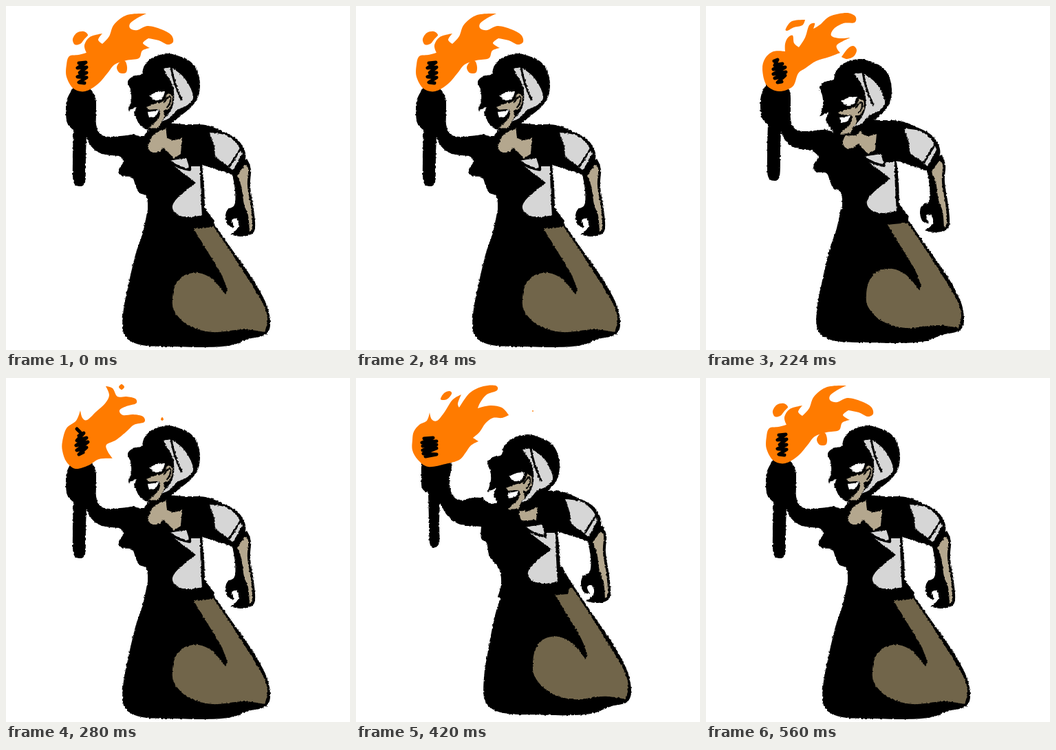
Write an HTML page that moves like this. It is 500 px wide and 500 px high and loops after 0.63 s.

```html
<!DOCTYPE html>
<html lang="en">
<head>
<meta charset="utf-8">
<title>Torch bearer</title>
<style>
  html, body { margin: 0; width: 100%; height: 100%; overflow: hidden; background: #fff; }
  svg { display: block; width: 100vw; height: 100vh; }
</style>
</head>
<body>
<svg id="stage" viewBox="0 0 500 500">
  <filter id="rough" filterUnits="userSpaceOnUse" x="0" y="0" width="500" height="500" color-interpolation-filters="sRGB">
    <feTurbulence type="fractalNoise" baseFrequency=".35" numOctaves="1" seed="4"/>
    <feDisplacementMap in="SourceGraphic" scale="3.5" xChannelSelector="R" yChannelSelector="G"/>
  </filter>
</svg>
<script>
const INK = '#000', CLOTH = '#d6d6d6', SKIN = '#b4a78e', BROWN = '#71654a', FIRE = '#ff7b00', WHITE = '#fff';
const stage = document.getElementById('stage');

function add(parent, tag, attrs) {
  const el = document.createElementNS('http://www.w3.org/2000/svg', tag);
  for (const key in attrs) el.setAttribute(key, attrs[key]);
  return parent.appendChild(el);
}

// Closed smooth outline through the points; "!" marks a sharp corner.
function outline(text) {
  const pts = text.split(',').map(s => {
    const [x, y] = s.replace('!', '').trim().split(' ').map(Number);
    return { x, y, sharp: s.includes('!') };
  });
  const n = pts.length;
  const handle = (i, sign) => {
    const p = pts[i], a = pts[(i + n - 1) % n], b = pts[(i + 1) % n];
    const k = p.sharp ? 0 : sign / 6;
    return `${(p.x + (b.x - a.x) * k).toFixed(1)} ${(p.y + (b.y - a.y) * k).toFixed(1)}`;
  };
  let d = `M${pts[0].x} ${pts[0].y}`;
  for (let i = 0; i < n; i++) {
    const j = (i + 1) % n;
    d += `C${handle(i, 1)} ${handle(j, -1)} ${pts[j].x} ${pts[j].y}`;
  }
  return d + 'Z';
}

const fill = (g, color, pts) => add(g, 'path', { d: outline(pts), fill: color });
const line = (g, d, width) => add(g, 'path', {
  d, fill: 'none', stroke: INK, 'stroke-width': width, 'stroke-linecap': 'round', 'stroke-linejoin': 'round'
});
const group = (parent, transform) => add(parent, 'g', transform ? { transform } : {});

function drawSkirt(g) {
  fill(g, INK, '!205 300,!288 292,303 317,330 356,360 399,379 435,384 460,381 474,372 480,352 484,328 493,290 496,240 495,205 494,181 487,170 472,171 440,178 405,188 362,199 329');
  fill(g, BROWN, '!273 324,!302 321,325 355,354 400,374 434,380 455,!376 474,345 470,300 474,265 464,245 444,242 425,247 404,260 391,280 388,300 397,!319 419,!322 413,312 388,293 357');
}

function drawRightArm(g) {
  fill(g, INK, '!328 240,!350 222,356 237,355 262,360 295,362 322,356 332,340 335,!326 332,336 324,338 316,334 309,328 312,!332 322,323 319,319 307,322 296,332 289,333 268');
  fill(g, SKIN, '!336 247,!347 231,352 237,351 262,356 293,358 320,!354 328,352 305,346 288,342 262');
}

function drawTorso(g, front, neck) {
  fill(g, INK, '!205 182,232 171,262 172,290 173,312 181,335 193,346 208,348 222,340 238,!331 246,310 239,!285 231,288 262,!289 294,!303 312,!300 322,' + front);
  fill(g, SKIN, neck);
  fill(g, CLOTH, '!237 225,!262 221,!266 233,!282 233,283 270,!285 304,264 307,249 303,242 294,245 284,257 272,!276 257,!266 249,251 238');
  line(g, 'M238 226Q251 236 267 238L269 221', 4);
  fill(g, CLOTH, '!296 184,320 188,336 201,!343 215,!330 239,!318 229,305 219,303 204');
  line(g, 'M342 206Q334 218 325 233', 3);
}

function drawHead(g) {
  fill(g, INK, '!177 153,182 136,181 122,177 110,185 102,197 99,201 87,213 75,235 69,252 73,267 80,277 92,282 112,279 133,268 148,252 161,240 171,!230 180,208 180,196 174,!186 157,!190 146');
  fill(g, CLOTH, '!228 91,!240 89,256 101,267 117,272 134,262 145,249 151,239 162,!226 168,238 154,244 138,243 118,236 103');
  line(g, 'M240 89Q244 114 255 136', 3);
  fill(g, SKIN, '!204 147,217 142,229 138,!235 127,241 130,241 141,236 150,229 152,231 160,226 168,!222 177,!207 178,213 172,222 163,223 151,!209 151');
  line(g, 'M230 140Q236 129 239 133Q240 142 234 147', 2.5);
  fill(g, WHITE, '!208 130,220 125,!231 124,227 134,217 137');
  fill(g, WHITE, '!206 154,214 153,!222 151,218 159,!208 162');
}

const FRONT = '!203 316,206 295,204 277,193 271,188 260,183 249,168 247,164 238,171 225,!163 217,!166 190,185 187,198 190';
const FRONT_LEAN = '!211 330,!198 326,203 307,200 286,186 267,182 248,174 241,!174 224,!150 223,!152 184,172 182,190 191';
const NECK = '!206 205,213 189,223 182,!232 175,!234 191,243 195,!256 192,!254 215,!244 221,!229 206,222 212,211 212';
const NECK_LEAN = '!229 201,!237 194,!238 203,!256 196,!254 214,!241 215,232 214';

const ARM = '!98 118,!121 118,130 133,131 155,131 172,136 185,150 190,!185 187,!180 219,152 217,135 213,123 203,!117 190,116 220,115 255,107 262,98 255,97 222,!98 180,89 170,87 150,89 135';
const ARM_LEAN = '!95 118,!137 118,139 128,136 148,138 165,146 176,160 177,!185 173,!186 216,166 214,149 212,133 200,!122 182,121 210,121 239,113 247,107 239,106 205,!105 167,96 160,95 140';

// Offsets of each body part for the three poses.
const POSES = [
  { skirt: 'translate(0 0)', torso: 'translate(0 0)', arm: 'translate(0 0)', head: 'translate(0 0)' },
  { skirt: 'translate(-9 -6)', torso: 'translate(-8 -6)', arm: 'translate(-8 -8)', head: 'translate(-12 8)' },
  { skirt: 'matrix(1 0 .027 1.06 3.5 -35.4)', torso: 'translate(8 -8)', arm: 'translate(0 0)', head: 'translate(14 13)', lean: true }
];

const FLAMES = [
  {
    shapes: [
      '88 85,92 73,105 71,!117 68,114 57,122 45,!140 40,134 49,!140 55,150 44,157 27,176 13,!204 11,190 18,180 26,181 33,191 35,206 29,226 34,240 42,243 52,235 56,222 50,!207 47,199 54,!209 61,198 65,193 76,175 79,158 85,148 97,134 113,115 124,98 120,88 103',
      '97 48,103 39,113 37,119 42,114 48,108 55,100 56',
      '161 89,166 81,173 80,176 89,174 97,165 97'
    ],
    char: 'M106 83L116 82L104 90L117 89L107 97L117 97L104 103L117 104L106 111L114 112'
  },
  {
    shapes: [
      '82 92,86 76,98 66,!115 66,115 55,119 46,126 43,128 54,!135 60,144 46,150 28,158 25,!156 33,166 27,180 15,204 10,217 15,216 24,200 25,186 33,182 43,194 47,!210 46,190 57,!195 68,179 74,160 80,145 90,134 98,126 117,106 124,88 115',
      '116 33,125 22,!144 20,140 28,128 31,118 36',
      '!197 74,206 62,214 58,219 64,215 73,205 77'
    ],
    char: 'M99 80L104 78L100 86L111 84L98 92L115 89L98 99L116 96L100 105L115 101L104 111L110 110'
  },
  {
    shapes: [
      '82 92,88 73,102 62,!108 47,111 58,118 61,131 49,144 37,150 25,!145 12,155 15,162 27,175 27,188 30,189 37,175 41,165 47,170 54,185 53,199 56,201 64,186 68,176 77,160 90,146 97,148 107,!155 117,135 118,120 127,101 132,88 122,82 106',
      '164 13,168 9,172 13,168 17',
      '225 60,227 57,229 60,227 62'
    ],
    char: 'M103 74L108 79M106 84L113 80L103 91L117 87L102 98L119 93L103 105L117 101L106 111L112 108'
  },
  {
    shapes: [
      '82 90,84 78,92 68,103 62,!107 50,110 60,118 62,129 49,140 32,!153 24,148 37,!150 43,165 22,185 12,203 11,205 18,190 24,181 35,!177 44,195 40,212 43,!222 54,212 58,199 58,188 66,180 78,!170 87,!178 92,167 98,159 109,150 119,130 125,105 129,90 119,82 105',
      '123 31,128 22,136 19,139 23,132 31',
      '256 48,257 47,258 48,257 49'
    ],
    char: 'M99 88L112 87L96 94L117 92L97 99L117 97L97 105L117 102L98 110L117 111L101 114'
  }
];

const bodies = POSES.map(pose => {
  const g = add(stage, 'g', { filter: 'url(#rough)' });
  drawRightArm(group(g, pose.torso));
  drawSkirt(group(g, pose.skirt));
  drawTorso(group(g, pose.torso), pose.lean ? FRONT_LEAN : FRONT, pose.lean ? NECK_LEAN : NECK);
  fill(group(g, pose.arm), INK, pose.lean ? ARM_LEAN : ARM);
  drawHead(group(g, pose.head));
  return g;
});

const flames = FLAMES.map(flame => {
  const g = group(stage);
  flame.shapes.forEach(s => fill(g, FIRE, s));
  line(g, flame.char, 5);
  return g;
});

// [start ms, body, flame]
const STEPS = [[0, 0, 0], [140, 1, 1], [280, 0, 2], [420, 2, 3], [560, 0, 0]];
const LOOP = 630;

const pick = (list, on) => list.forEach((g, i) => { g.style.display = i === on ? '' : 'none'; });

let start = null;
function tick(now) {
  if (start === null) start = now;
  const t = (now - start) % LOOP;
  const [, body, flame] = STEPS.filter(s => s[0] <= t).pop();
  pick(bodies, body);
  pick(flames, flame);
  requestAnimationFrame(tick);
}
pick(bodies, 0);
pick(flames, 0);
requestAnimationFrame(tick);
</script>
</body>
</html>
```
